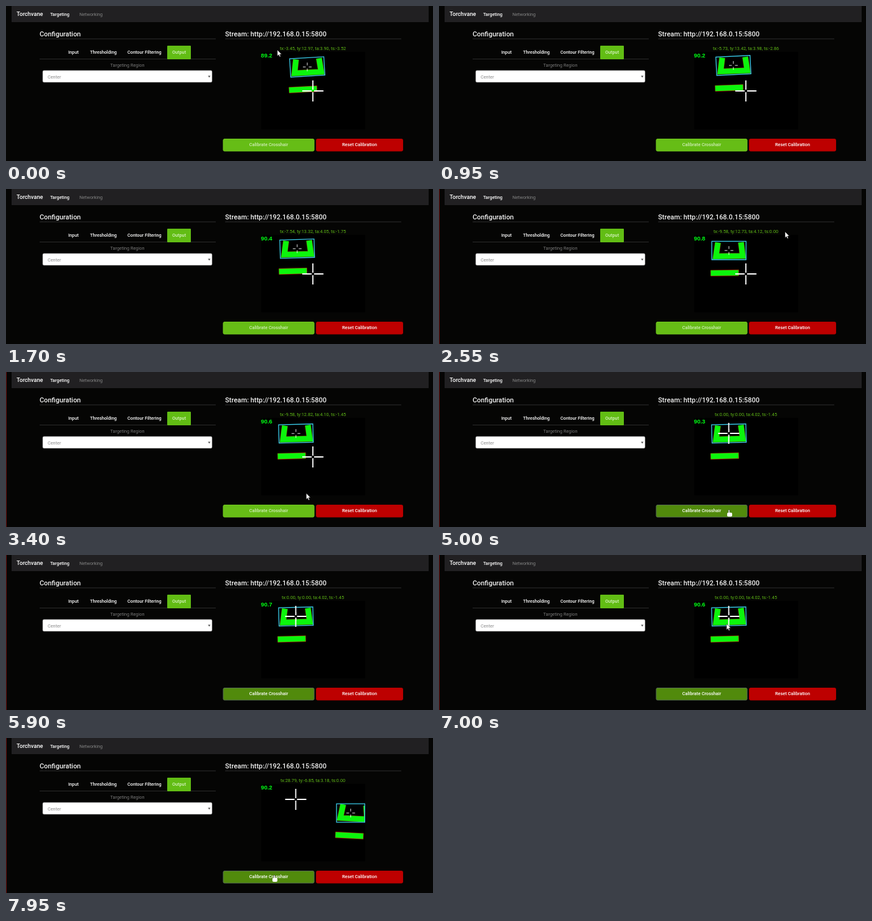
These frames come from a looping animation (686x250 px, 8 s). An HTML page with a canvas:

```html
<!DOCTYPE html>
<html lang="en">
<head>
<meta charset="utf-8">
<title>Vision settings</title>
<style>
html, body { margin: 0; width: 100%; height: 100%; overflow: hidden; background: #050504; }
canvas { display: block; width: 686px; height: 250px; }
</style>
</head>
<body>
<canvas id="stage"></canvas>
<script>
const W = 686, H = 250, LOOP = 8000, STEP = 50;
const HOVER = 3600, CLICK = 4500, LEAVE = 4950;
const VIEW = { x: 410, y: 74, w: 167, h: 125 };
const SANS = 'Roboto, sans-serif';
const LIME = '#0cf50c';

const canvas = document.getElementById('stage');
const ctx = canvas.getContext('2d');
const ratio = window.devicePixelRatio || 1;
canvas.width = W * ratio;
canvas.height = H * ratio;

const mix = (a, b, k) => a + (b - a) * k;
const ramp = (t, from, to) => Math.min(1, Math.max(0, (t - from) / (to - from)));
const easeOut = k => 1 - (1 - k) ** 2;
const smooth = k => k * k * (3 - 2 * k);

function text(str, x, y, size, color, { align = 'left', weight = 500, family = SANS } = {}) {
  ctx.font = `${weight} ${size}px ${family}`;
  ctx.textAlign = align;
  ctx.fillStyle = color;
  ctx.fillText(str, x, y);
}

function rect(x, y, w, h, color) {
  ctx.fillStyle = color;
  ctx.fillRect(x, y, w, h);
}

function box(x, y, w, h, r, fill, edge, line = 1) {
  ctx.beginPath();
  ctx.roundRect(x, y, w, h, r);
  ctx.fillStyle = fill;
  ctx.fill();
  if (edge) stroke(edge, line);
}

function path(points) {
  ctx.beginPath();
  points.forEach(([x, y]) => ctx.lineTo(x, y));
}

function stroke(color, width) {
  ctx.strokeStyle = color;
  ctx.lineWidth = width;
  ctx.stroke();
}

function cross(x, y, gap, len, width) {
  ctx.beginPath();
  for (const side of [-1, 1]) {
    ctx.moveTo(x + side * gap, y);
    ctx.lineTo(x + side * len, y);
    ctx.moveTo(x, y + side * gap);
    ctx.lineTo(x, y + side * len);
  }
  stroke('#fff', width);
}

function placed(x, y, deg, draw) {
  ctx.save();
  ctx.translate(x, y);
  ctx.rotate(deg * Math.PI / 180);
  draw();
  ctx.restore();
}

// The camera drifts right, rests, then turns quickly to the left.
function cameraState(t) {
  const drift = ramp(t, 0, 2550), rest = ramp(t, 2600, 3400), turn = ramp(t, 7200, 7950);
  const bump = Math.sin(Math.PI * drift);
  const before = t < CLICK;
  const seconds = t / 1000;
  return {
    x: mix(mix(484, 465.8, easeOut(drift)), 558.5, turn),
    y: mix(mix(98.3, 99.2, drift) - 3 * bump, 121, turn),
    tilt: mix(mix(-3, -0.7, drift) - 0.8 * rest, 3, turn),
    tx: before ? mix(-3.45, -9.58, drift) : 28.79 * turn,
    ty: before ? mix(12.97, 12.73, drift) + 0.59 * bump + 0.09 * rest : -6.85 * turn,
    ta: mix(mix(3.9, 4.12, drift) - (before ? 0.02 : 0.1) * rest, 3.18, turn),
    ts: (-3.52 * (1 - drift ** 1.7) - 1.45 * rest) * (1 - turn),
    fps: 90.48 - 1.25 * Math.exp(-t / 200) + 0.3 * Math.cos(2 * Math.PI * (seconds - 2.7) / 3.7)
  };
}

function drawPage(t) {
  rect(0, 0, W, H, '#050504');
  rect(9, 0, 670, 26, '#212022');
  if (t >= 1750) rect(0, 0, 1, H, '#6a1010');

  text('Torchvane', 17, 16.2, 9.2, '#fff');
  text('Targeting', 71, 15.6, 7.3, '#fff');
  text('Networking', 118, 15.6, 7.3, '#858585', { weight: 400 });

  text('Configuration', 54, 48.5, 10.9, '#f4f4f4');
  text('Stream: http://192.168.0.15:5800', 352, 48.5, 10.9, '#f4f4f4');
  for (const x of [54, 352]) rect(x, 52.5, 283, 1, '#2e2e2e');
  rect(54, 85, 283, 1, '#2b2b2b');

  for (const [label, x] of [['Input', 100], ['Thresholding', 135], ['Contour Filtering', 195]]) {
    text(label, x, 76.8, 7.3, '#fff');
  }
  box(259, 64, 38, 22, 1, '#62bd14');
  text('Output', 278, 76.8, 7.3, '#d6f2c0', { align: 'center' });

  text('Targeting Region', 195, 97.7, 7.3, '#7a7a7a', { align: 'center', weight: 400 });
  box(59, 104, 272, 19, 2, '#fff', '#999', 0.6);
  text('Center', 67, 116.6, 7.3, '#8a8a8a', { weight: 400 });
  path([[324.5, 112.5], [328.5, 112.5], [326.5, 115.5]]);
  ctx.fillStyle = '#555';
  ctx.fill();
}

function drawButtons(t) {
  const [fill, edge, ink] =
    t < HOVER ? ['#66bd16', '#70c81c', '#d0edb8'] :
    t < LEAVE ? ['#3e6a06', '#57704f', '#fff'] :
    ['#518a0c', '#57704f', '#fff'];
  box(349, 214.5, 146, 19.5, 2, fill, edge);
  text('Calibrate Crosshair', 422, 226.4, 7.3, ink, { align: 'center' });
  box(498.5, 214.5, 139, 19.5, 2, '#bd0000', '#b40000');
  text('Reset Calibration', 568, 226.4, 7.3, '#fff', { align: 'center' });
}

function drawTarget({ x, y, tilt, ts }) {
  placed(x, y, tilt, () => {
    path([[-17.5, -13], [-21, 9], [22, 9], [19.5, -13]]);
    stroke('#6e1408', 10);
    stroke(LIME, 9);
  });
  placed(x - 7, y + 36.2, tilt, () => {
    rect(-22.5, -5, 45.5, 10.2, '#a81c08');
    rect(-22.2, -4.4, 44.6, 8.8, LIME);
  });

  // The outline stops at the edge of the picture.
  const left = x - 27.5, right = Math.min(x + 27.5, VIEW.x + VIEW.w - 0.5);
  const mid = (left + right) / 2, width = right - left;
  placed(mid, y, ts, () => {
    ctx.beginPath();
    ctx.rect(-width / 2, -14.8, width, 29.6);
    stroke('#3accea', 1.3);
  });
  cross(mid, y, 2.5, 7, 0.9);
}

function drawStream(t) {
  const cam = cameraState(t);
  ctx.save();
  ctx.beginPath();
  ctx.rect(VIEW.x, VIEW.y, VIEW.w, VIEW.h);
  ctx.clip();
  rect(VIEW.x, VIEW.y, VIEW.w, VIEW.h, '#000');
  drawTarget(cam);
  if (t < CLICK) cross(493, 137, 2, 17, 1.8);
  else cross(465.5, 99, 2, 17, 1.8);
  ctx.restore();

  text(cam.fps.toFixed(1), 409.5, 83, 9.4, '#00ff14',
    { weight: 900, family: '"Liberation Sans", sans-serif' });
  const status = ['tx', 'ty', 'ta', 'ts'].map(key => `${key}:${cam[key].toFixed(2)}`).join(', ');
  text(status, 493, 71, 7.3, '#5fb816', { align: 'center', weight: 400 });
}

function drawArrow() {
  path([[0, 0], [0, 9.5], [2.2, 7.5], [3.7, 11], [5.2, 10.3], [3.7, 7], [6.6, 6.8]]);
  ctx.closePath();
  ctx.fillStyle = '#fff';
  ctx.fill();
  stroke('#222', 0.5);
}

function drawHand() {
  box(-1, 0, 2, 8, 1, '#fff', '#222', 0.5);
  box(-3, 4.5, 8, 6.5, 2, '#fff');
}

// The pointer rests at a few places and glides between them.
function pointerAt(t) {
  const stops = [
    { x: 436, y: 71 },
    { x: 556, y: 69, from: 450, to: 2400 },
    { x: 466, y: 224, from: 2600, to: 3700 },
    { x: 462, y: 111, from: 4850, to: 6900 },
    { x: 431, y: 221, from: 7150, to: 7900 }
  ];
  return stops.reduce((p, stop) => {
    const k = smooth(ramp(t, stop.from, stop.to));
    return { x: mix(p.x, stop.x, k), y: mix(p.y, stop.y, k) };
  });
}

function drawPointer(t) {
  const away = (t > 700 && t < 1750) || (t > 5500 && t < 6200);
  if (away) return;
  const { x, y } = pointerAt(t);
  const overButton = x > 349 && x < 495 && y > 214 && y < 234;
  placed(x, y, 0, overButton ? drawHand : drawArrow);
}

function frame(now) {
  const t = Math.floor((now % LOOP) / STEP) * STEP;
  ctx.setTransform(ratio, 0, 0, ratio, 0, 0);
  drawPage(t);
  drawStream(t);
  drawButtons(t);
  drawPointer(t);
}

const start = performance.now();
function tick() {
  frame(performance.now() - start);
  requestAnimationFrame(tick);
}
tick();
</script>
</body>
</html>
```
